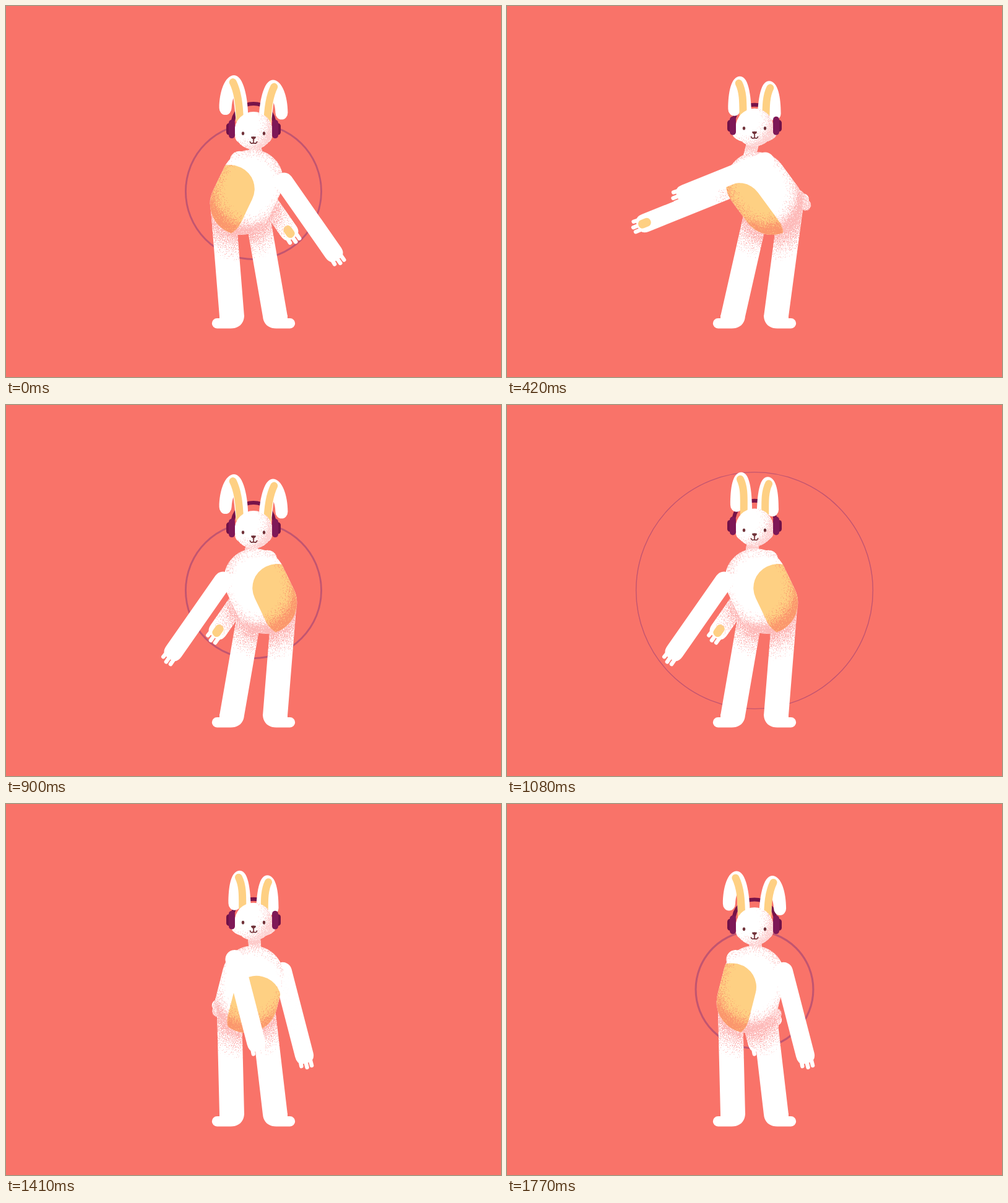
These frames come from a looping animation (800x600 px, 1.8 s). An HTML page:

```html
<!DOCTYPE html>
<html lang="en">
<head>
<meta charset="utf-8">
<title>Dancing rabbit</title>
<style>
  html, body { margin: 0; width: 100%; height: 100%; overflow: hidden; background: #f97369; }
  svg { display: block; width: 100vw; height: 100vh; }
  .white { fill: #fff; }
  .limb { stroke: #fff; stroke-linecap: round; fill: none; }
</style>
</head>
<body>
<svg viewBox="0 0 800 600">
  <defs id="defs">
    <radialGradient id="nearBody" gradientUnits="userSpaceOnUse" r="100">
      <stop offset=".48" stop-opacity=".9"/><stop offset=".68" stop-opacity=".5"/><stop offset=".95" stop-opacity="0"/>
    </radialGradient>
    <radialGradient id="bodyShade" gradientUnits="userSpaceOnUse" cx="0" cy="-30" r="80">
      <stop offset=".54" stop-opacity="0"/><stop offset=".76" stop-opacity=".5"/><stop offset=".9" stop-opacity="1"/>
    </radialGradient>
    <radialGradient id="patchShade" gradientUnits="userSpaceOnUse" cx="0" cy="-30" r="80">
      <stop offset=".5" stop-opacity="0"/><stop offset=".74" stop-opacity=".5"/><stop offset=".9" stop-opacity="1"/>
    </radialGradient>
    <radialGradient id="headShade" gradientUnits="userSpaceOnUse" cx="-16" cy="-10" r="50">
      <stop offset=".45" stop-opacity="0"/><stop offset=".72" stop-opacity=".45"/><stop offset=".95" stop-opacity="1"/>
    </radialGradient>
    <radialGradient id="neckShade" gradientUnits="userSpaceOnUse" cx="400" r="60">
      <stop offset=".6" stop-opacity="1"/><stop offset=".82" stop-opacity=".3"/>
    </radialGradient>
    <clipPath id="bodyClip"><rect x="-50" y="-92" width="100" height="142" rx="50"/></clipPath>
  </defs>

  <rect width="800" height="600" fill="#f97369"/>
  <circle id="ring" cx="400" cy="300" fill="none" stroke="#7a2c78" stroke-opacity=".43"/>

  <g id="tailFrame">
    <g id="tail">
      <g class="white"><circle cx="-5" r="11"/><circle cy="-9" r="9"/><circle cx="3" r="9"/><circle cy="9" r="9"/></g>
      <g filter="url(#tailDots)" fill-opacity=".62"><path d="M-8-14A9 9 0 0 1 9-9Q12 0 9 9A9 9 0 0 1-8 14Z"/></g>
    </g>
  </g>

  <g id="farArm"></g>
  <g filter="url(#armDots)"><path id="farShade" fill="none" stroke="url(#nearBody)" stroke-width="30" stroke-linecap="round"/></g>

  <g class="white">
    <path id="foot" d="M385 500C385 514 376 521.5 363 521.5H341a8.2 8.2 0 0 1 0-16.4H345V500Z"/>
    <use href="#foot" transform="translate(800) scale(-1 1)"/>
  </g>
  <path id="legs" class="white"/>
  <g filter="url(#legDots)"><path id="legShade" fill="url(#nearBody)"/></g>

  <path id="neck" class="limb" stroke-width="20"/>
  <g filter="url(#neckDots)"><path id="neckTint" fill="none" stroke="url(#neckShade)" stroke-width="20"/></g>

  <g id="body">
    <rect x="-50" y="-92" width="100" height="142" rx="50" class="white"/>
    <g filter="url(#bodyDots)"><rect x="-50" y="-92" width="100" height="142" rx="50" fill="url(#bodyShade)"/></g>
    <g clip-path="url(#bodyClip)">
      <rect class="patch" width="78" rx="38" fill="#fed083"/>
      <g filter="url(#patchDots)"><rect class="patch" width="78" rx="38" fill="url(#patchShade)"/></g>
    </g>
  </g>
  <g id="nearArm"></g>

  <path id="band" fill="none" stroke="#771349" stroke-width="6"/>
  <g id="ear">
    <path id="earShape" class="white"/>
    <path id="earInner" fill="none" stroke="#fed083" stroke-width="12" stroke-linecap="round"/>
  </g>
  <use href="#ear" transform="translate(800 7.5) scale(-1 1)"/>

  <g id="head">
    <g class="white"><circle cy="2.5" r="30.5"/><ellipse class="cheeks" cy="12" ry="16"/></g>
    <g filter="url(#headDots)" fill="url(#headShade)">
      <path id="headTint"/>
    </g>
    <g id="cup">
      <rect x="-44" y="-9.5" width="12" height="19" rx="4.5" fill="#701148"/>
      <rect x="-40" y="-15" width="10" height="30" rx="5" fill="#7e1857"/>
    </g>
    <use href="#cup" transform="scale(-1 1)"/>
    <g id="face" fill="#71333a">
      <ellipse cx="-17" rx="2.2" ry="2.8"/><ellipse cx="17" rx="2.2" ry="2.8"/>
      <path d="M-4 5.5Q0 4.2 4 5.5Q4.2 8 0 10Q-4.2 8-4 5.5Z"/>
      <path d="M0 8V15M-5.5 13.5Q-5 17 0 15.5Q5 17 5.5 13.5" fill="none" stroke="#71333a" stroke-width="1.7" stroke-linecap="round"/>
    </g>
  </g>
</svg>

<script>
const LOOP = 1800, HALF = 900, FRAME = 30;
const $ = id => document.getElementById(id);
const set = (el, attrs) => { for (const k in attrs) el.setAttribute(k, attrs[k]); };
const clamp = (v, lo, hi) => Math.min(hi, Math.max(lo, v));

// Grain: turns soft alpha into scattered dots of one colour
function addGrain(id, color, x, y, width, height) {
  $('defs').insertAdjacentHTML('beforeend', `
    <filter id="${id}" filterUnits="userSpaceOnUse" x="${x}" y="${y}" width="${width}" height="${height}" color-interpolation-filters="sRGB">
      <feTurbulence type="fractalNoise" baseFrequency=".73" numOctaves="2" seed="4"/>
      <feColorMatrix values="0 0 0 0 0  0 0 0 0 0  0 0 0 0 0  0 0 0 2.2 -.6" result="noise"/>
      <feComposite in="SourceAlpha" in2="noise" operator="arithmetic" k2="8" k3="8" k4="-8" result="dots"/>
      <feFlood flood-color="${color}"/>
      <feComposite in2="dots" operator="in"/>
    </filter>`);
}
addGrain('bodyDots', '#fdbab9', -55, -95, 110, 150);
addGrain('patchDots', '#fb976d', -55, -72, 110, 130);
addGrain('legDots', '#fdbab9', 290, 310, 220, 115);
addGrain('armDots', '#fdbab9', 270, 215, 260, 210);
addGrain('tailDots', '#fdbab9', -20, -22, 40, 44);
addGrain('headDots', '#fdd3d3', -40, -32, 80, 68);
addGrain('neckDots', '#fdcbca', 365, 200, 70, 60);

const ARM = `<path class="white" d="M-15 0A15 15 0 0 1 15 0V139Q15 153 3 153H-3Q-15 153-15 139Z"/>
  <path class="limb" stroke-width="6.5" d="M-8.5 148L-9 156M-.5 150V160M7.5 150V159"/>`;
$('nearArm').innerHTML = ARM;
$('farArm').innerHTML = ARM + '<rect id="pad" x="-7" y="130" width="14" height="21" rx="6.5" fill="#fed083"/>';

// Cosine easing through extremes given as [time, value]
function through(keys, t) {
  let i = 1;
  while (i < keys.length - 1 && t > keys[i][0]) i++;
  const [t0, a] = keys[i - 1], [t1, b] = keys[i];
  return a + (b - a) * (1 - Math.cos(Math.PI * clamp((t - t0) / (t1 - t0), 0, 1))) / 2;
}
const YAW = [[-210, -49], [90, -20], [390, -49], [690, 49], [990, 20]];
const BOB = [[-110, 189], [60, 203], [255, 192], [380, 195], [540, 187], [670, 196], [790, 189], [960, 203]];
const EAR = [[-110, 362], [15, 345], [185, 362], [310, 353], [490, 361], [610, 353], [790, 362], [915, 345]];
const NOD = [[-180, 1], [-20, 0], [150, 0], [400, 1], [720, 1], [880, 0], [900, 0]];

function drawRing(t) {
  const u = ((t + 340) % HALF) / 700;
  set($('ring'), {
    r: u < 1 ? 229 * u * u * (3 - 2 * u) : 0,
    'stroke-width': Math.max(0, 5.5 * (1 - u)),
    visibility: u < 1 ? 'visible' : 'hidden'
  });
}

function drawHead(p, neckX) {
  const y = through(BOB, p), nod = through(NOD, p), left = through(EAR, p) - 1;
  const ey = y + 7 * nod, d = left - 345, tip = 369 + .62 * d, base = 391.5 + .3 * d;
  set($('earShape'), { d: `M${base} ${ey - 18}C${base} ${ey - 50} ${tip + 15} ${ey - 87} ${tip} ${ey - 87}
    C${tip - 15} ${ey - 87} ${left} ${ey - 60} ${left} ${ey - 34}a10 11 0 0 0 20 0
    Q${left + 20.5} ${ey - 44} ${left + 23} ${ey - 50}L${372 + .3 * d} ${ey - 12}L${base} ${ey - 10}Z` });
  set($('earInner'), { d: `M${tip - 2} ${ey - 76}C${tip + 6} ${ey - 60} ${base - 14} ${ey - 40} ${base - 13.5} ${ey - 14}` });
  const arch = (ey - 41 - .25 * (y - 5)) / .75;
  set($('band'), { d: `M366 ${y - 5}C366 ${arch} 434 ${arch} 434 ${y - 5}` });

  const cheek = 30 + 6 * nod;
  set($('head'), { transform: `translate(400 ${y})` });
  set($('face'), { transform: `translate(0 ${7 - 3 * nod})` });
  document.querySelector('.cheeks').setAttribute('rx', cheek);
  set($('headTint'), { d: `M-30.5 2.5a30.5 30.5 0 0 1 61 0a30.5 30.5 0 0 1-61 0Z
    M${-cheek} 12a${cheek} 16 0 0 1 ${2 * cheek} 0a${cheek} 16 0 0 1 ${-2 * cheek} 0Z` });

  const neck = `M400 ${y + 18}L${neckX} 250`;
  set($('neck'), { d: neck });
  set($('neckTint'), { d: neck });
  set($('neckShade'), { cy: y });
}

function drawPose(t) {
  const p = t % HALF, side = t < HALF ? 1 : -1;
  const a = Math.PI * (t - 90) / 300;
  const hip = -33.9 * Math.cos(a) + 2.1 * Math.cos(3 * a);
  const swing = 68.2 * Math.cos(a) + 5.4 * Math.cos(3 * a) - 2.2 * Math.cos(5 * a);
  const yaw = side * through(YAW, p);
  const tilt = -1.17 * hip, rad = tilt * Math.PI / 180, lean = Math.abs(Math.sin(rad));
  const bx = 400 + .92 * hip, by = 320;
  const fromBody = (x, y) => [
    bx + x * Math.cos(rad) - y * Math.sin(rad),
    by + x * Math.sin(rad) + y * Math.cos(rad)
  ];
  const frame = { transform: `translate(${bx} ${by}) rotate(${tilt})` };

  set($('body'), frame);
  set($('tailFrame'), frame);
  const turn = clamp(yaw / 18, -1, 1);
  set($('tail'), {
    transform: `translate(${-turn * (54 - 20 * lean)} ${12 + 20 * lean}) scale(${turn > 0 ? -1 : 1} 1)`
  });
  const patchTop = -36 - .65 * Math.abs(yaw);
  document.querySelectorAll('.patch').forEach(el =>
    set(el, { x: yaw - 39, y: patchTop, height: 66 - patchTop }));
  set($('bodyShade'), { cx: yaw * .15 });
  set($('patchShade'), { cx: -yaw * .2 });
  set($('nearBody'), { cx: bx, cy: by });

  // The arm on the far side passes behind the body; shoulders slide with the lean
  const nearSide = yaw < 0 ? 1 : -1, slide = 9 * Math.sin(2 * rad);
  const near = fromBody(slide + 40 * nearSide, -62), far = fromBody(slide - 40 * nearSide, -62);
  set($('nearArm'), { transform: `translate(${near}) rotate(${-swing})` });
  set($('farArm'), { transform: `translate(${far}) rotate(${-swing})` });
  const s = swing * Math.PI / 180;
  set($('farShade'), {
    d: `M${far}l${134 * Math.sin(s)} ${134 * Math.cos(s)}`,
    'stroke-opacity': clamp((Math.abs(yaw) - 15) / 6, 0, 1)
  });
  set($('pad'), { opacity: clamp((Math.abs(swing) - 18) / 10, 0, 1) });

  const leg = (ankle, top) => `M${ankle - 20} 502L${top - 20} 330H${top + 20}L${ankle + 20} 502Z`;
  const legs = leg(365, 373 + hip) + leg(435, 427 + hip);
  set($('legs'), { d: legs });
  set($('legShade'), { d: legs });

  drawHead(p, 400 - hip * .32);
}

function render(ms) {
  const t = Math.floor(ms / FRAME) * FRAME % LOOP;
  drawRing(t);
  drawPose(t);
}

const start = performance.now();
function tick() {
  render(performance.now() - start);
  requestAnimationFrame(tick);
}
tick();
</script>
</body>
</html>
```
